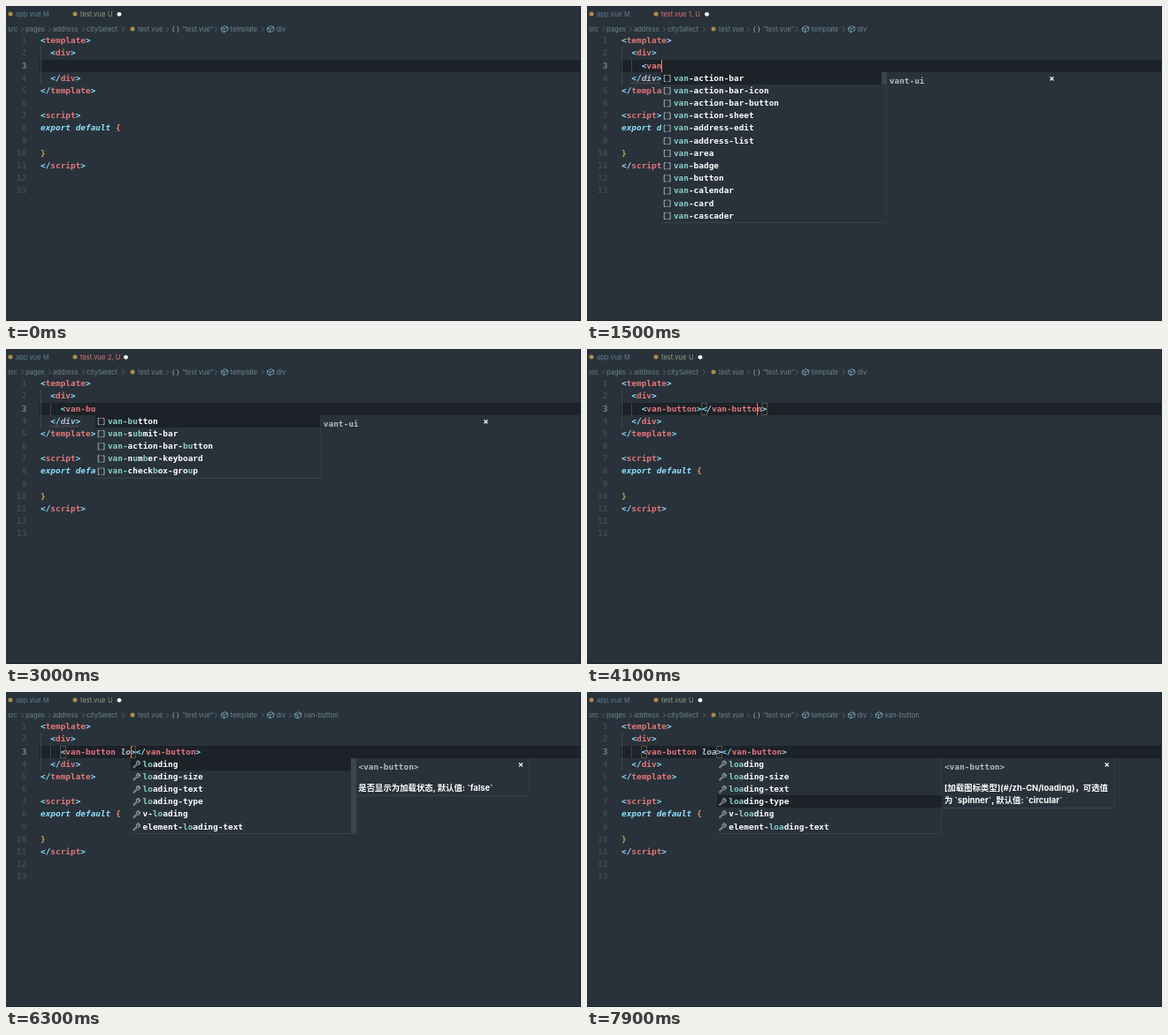
An HTML page for the animation above (8000 ms loop, 650 by 357 pixels).

```html
<!DOCTYPE html>
<html lang="en">
<head>
<meta charset="utf-8">
<title>Editor completion</title>
<style>
  html, body { margin: 0; width: 100%; height: 100%; overflow: hidden; background: #29323a; }
  svg { display: block; }
  rect { shape-rendering: crispEdges; }
  text { white-space: pre; }
  .mono { font: bold 9.41px "DejaVu Sans Mono", monospace; }
  .ui { font: 7.5px Inter, "Open Sans", sans-serif; }
  .doc { font: 700 9.4px Inter, "Noto Sans CJK SC", "Noto Sans CJK", sans-serif; fill: #fff; }
  .p { fill: #8fe0ff; }
  .t { fill: #e2777a; }
  .a { fill: #b3bfd0; font-style: italic; }
  .k { fill: #8fe0ff; font-style: italic; }
  .open { fill: #f08b62; }
  .close { fill: #d29c55; }
  .num { fill: #3d4b55; }
  .now { fill: #71868f; }
  .label { fill: #fff; }
  .hit { fill: #8acdca; }
  .head { fill: #b0bcc3; }
  .crumb { fill: #6c838e; }
  .icon { fill: none; stroke: #c3cfd5; stroke-width: .8; }
  .cube { fill: none; stroke: #7fb0c4; stroke-width: .8; stroke-linejoin: round; }
  .sep { fill: none; stroke: #5b6f79; stroke-width: .8; }
</style>
</head>
<body>
<svg id="stage" width="650" height="357" viewBox="0 0 650 357"></svg>
<script>
const LOOP = 8000, CW = 5.667, LH = 14.17, LEFT = 39, TOP = 32.3;
const BG = "#29323a", DARK = "#1c2228", EDGE = "#37424a", BAR = "#3a454e", GOLD = "#ae8a50";
const FULL = "<van-button></van-button>";

const van = names => names.split(" ").map(n => "van-" + n);
const lists = {
  html: "a abbr address article aside audio b base bdi bdo blockquote body".split(" "),
  van: van("action-bar action-bar-icon action-bar-button action-sheet address-edit address-list area badge button calendar card cascader"),
  vanB: van("badge button action-bar action-bar-icon action-bar-button nav-bar submit-bar tabbar tabbar-item sidebar checkbox number-keyboard"),
  vanBu: van("button submit-bar action-bar-button number-keyboard checkbox-group"),
  attrs: "block color disabled hairline icon icon-position icon-prefix loading loading-size loading-text loading-type native-type".split(" "),
  load: "loading loading-size loading-text loading-type v-loading element-loading-text".split(" ")
};

// start time, text of line 3, caret column, list, typed query
const steps = [
  [-700, "", 0],
  [450, "<", 1, "html", ""],
  [1050, "<v", 2, "van", "v"],
  [1250, "<va", 3, "van", "va"],
  [1400, "<van", 4, "van", "van"],
  [1750, "<van-", 5, "van", "van-"],
  [2250, "<van-b", 6, "vanB", "van-b"],
  [2500, "<van-bu", 7, "vanBu", "van-bu"],
  [3250, FULL, 25],
  [3800, FULL, 24],
  [4000, FULL, 23],
  [4700, FULL, 22],
  [5300, FULL, 11],
  [5650, "<van-button ></van-button>", 12, "attrs", ""],
  [5950, "<van-button l></van-button>", 13, "load", "l"],
  [6150, "<van-button lo></van-button>", 14, "load", "lo"],
  [6400, "<van-button loa></van-button>", 15, "load", "loa"]
];
const picks = [[7700, 3], [7450, 2], [7200, 1], [0, 0]];
const docs = [
  ["是否显示为加载状态, 默认值: `false`"],
  ["加载图标大小, 默认单位为 `px`"],
  ["加载状态提示文字"],
  ["[加载图标类型](#/zh-CN/loading)，可选值", "为 `spinner`, 默认值: `circular`"]
];

const esc = s => s.replace(/&/g, "&amp;").replace(/</g, "&lt;").replace(/>/g, "&gt;");
const text = (x, y, s, cls, extra = "") => `<text x="${x}" y="${y}" class="${cls}" ${extra}>${s}</text>`;
const rect = (x, y, w, h, fill, extra = "") => `<rect x="${x}" y="${y}" width="${w}" height="${h}" fill="${fill}" ${extra}/>`;
const path = (d, cls, x = 0, y = 0) => `<path d="${d}" class="${cls}" transform="translate(${x} ${y})"/>`;
const dot = (x, y, r, fill) => `<circle cx="${x}" cy="${y}" r="${r}" fill="${fill}"/>`;
const span = (s, cls) => `<tspan class="${cls}">${esc(s)}</tspan>`;
const colX = c => LEFT + c * CW;
const rowY = n => TOP + (n - 1) * LH;
const code = (n, col, html) => text(colX(col), rowY(n) + 10, html, "mono");

// Panel with a line along its right and bottom edges only
const panel = (x, y, w, h) => rect(x, y, w, h, BG) +
  rect(x, y + h - 1, w, 1, EDGE) + rect(x + w - 1, y, 1, h, "#303a42");

function markup(s, name = "t") {
  return s.split(/(<\/?|>|\s+[\w-]*)/).filter(Boolean)
    .map(w => span(w, /^[<>]/.test(w) ? "p" : w[0] === " " ? "a" : name)).join("");
}

function tabs(errors) {
  const color = errors ? "#e57373" : "#8fa184";
  const x = errors ? 135.5 : 128;
  return dot(5, 9, 2.5, GOLD) + dot(78, 9, 2.5, GOLD) +
    text(11, 11.7, "app.vue", "ui", 'fill="#5f7b8f"') + text(42, 11.7, "M", "ui", 'fill="#5f7b96"') +
    text(84, 11.7, "test.vue", "ui", `fill="${color}"`) +
    text(115, 11.7, errors ? errors + ", U" : "U", "ui", `fill="${color}"`) +
    dot(x, 9.3, 2.4, "#fff");
}

function crumbs(deep) {
  const words = [[2, "src"], [22, "pages"], [53, "address"], [91, "citySelect"], [149, "test.vue"],
    [199, "\"test.vue\""], [253.5, "template"], [305.5, "div"]];
  const seps = [17, 48, 86, 131, 181, 236, 289], cubes = [247, 299];
  if (deep) { words.push([336.5, "van-button"]); seps.push(320); cubes.push(330); }
  return words.map(([x, s]) => text(x, 29, s, "ui crumb")).join("") +
    seps.map(x => path("M0-2.7L2.7 0L0 2.7", "sep", x, 26.4)).join("") +
    cubes.map(x => path("M-3.6-1.4L.6-3.6L3.8-2V1.4L-.6 3.6L-3.6 2ZM-3.6-1.4L-.6 0L3.8-2M-.6 0V3.6", "cube", x, 26.2)).join("") +
    dot(143, 26, 2.5, GOLD) + text(187.5, 29, "{ }", "ui", 'fill="#a9bcc4"');
}

function page(line, broken) {
  let out = rect(37.5, rowY(3), 612, LH, DARK);
  for (let n = 1; n <= 13; n++)
    out += text(23.3, rowY(n) + 10, n, n === 3 ? "mono now" : "mono num", 'text-anchor="end"');
  out += rect(39, rowY(2), 1, LH * 3, "#3c4850");
  if (line) out += rect(50, rowY(3), 1, LH, "#3c4850");
  out += code(1, 0, markup("<template>")) + code(2, 2, markup("<div>")) +
    code(4, 2, markup("</div>", broken ? "a" : "t")) + code(5, 0, markup("</template>")) +
    code(7, 0, markup("<script>")) + code(8, 0, span("export default ", "k") + span("{", "open")) +
    code(10, 0, span("}", "close")) + code(11, 0, markup("<\/script>"));
  if (broken) {
    let wave = "M50 87.5";
    for (let i = 0; i < 8; i++) wave += "q1-2 2 0t2 0";
    out += `<path d="${wave}" fill="none" stroke="#80605f" stroke-width=".7"/>`;
  }
  return out;
}

// Indexes of the label's letters that match the query
function matches(label, query) {
  const run = s => {
    const i = label.lastIndexOf(s);
    return i < 0 ? null : [...s].map((c, k) => i + k);
  };
  const scan = s => {
    let i = 3;
    const found = [...s].map(c => i = i < 0 ? -1 : label.indexOf(c, i + 1));
    return found.includes(-1) ? null : found;
  };
  if (!query) return [];
  if (label.startsWith(query)) return [...query].map((c, k) => k);
  if (!query.startsWith("van-")) return run(query) || [];
  const tail = query.slice(4), back = [...tail].reverse().join("");
  return [0, 1, 2, 3].concat(run(tail) || scan(tail) || scan(back) || []);
}

function item(label, query, x, y, snippet) {
  const hit = matches(label, query);
  const html = [...label].map((c, i) => span(c, hit.includes(i) ? "hit" : "label")).join("");
  const icon = snippet
    ? path("M-1.6-3.6H-3.4V3.6H-1.6M1.6 3.6H3.4V-3.6H1.6M-.6-3.6H.6M-.6 3.6H.6", "icon", x + 6.3, y + 7.2)
    : path("M.2-.4C-.8-3 1.2-4.4 3-3.6L1.6-2L2.4-1.1L4-2.4C4.6-.4 2.8 1.4 1 .5L-2.8 4.2L-3.8 3.4Z", "icon", x + 6.5, y + 7);
  return icon + text(x + 13.6, y + 10, html, "mono");
}

function popup(x, key, query, pick) {
  const items = lists[key], top = rowY(4), h = items.length * LH + 1, end = x + 254.5;
  const snippet = key.startsWith("van");
  let out = panel(x, top, 254.5, h) + rect(x, top + pick * LH, 254, LH, DARK);
  if (key === "van") out += rect(end - 6, top, 6, LH, BAR);
  if (key === "load" && query !== "loa") out += rect(end - 6, top, 6, h, BAR);
  out += items.map((s, i) => item(s, query, x, top + i * LH, snippet)).join("");
  if (key === "html") return out;

  const lines = snippet ? [] : key === "attrs" ? ["是否为块级元素, 默认值: `false`"] : docs[pick];
  if (lines.length) out += panel(end, top, 195.5, 29 + lines.length * LH);
  out += text(x + 257.5, top + 12.7, snippet ? "vant-ui" : esc("<van-button>"), "mono head") +
    text(x + 441, top + 11, "×", "doc", 'text-anchor="middle"');
  return out + lines.map((s, i) => text(x + 257.3, 111.8 + i * LH, s, "doc")).join("");
}

function pointer(t) {
  if (t < 4800 || t >= 5550) return "";
  const k = Math.min(1, (t - 4800) / 250), ease = 1 - (1 - k) ** 3;
  return `<path d="M-1.5-4.5Q0-4.5 0-3V3Q0 4.5-1.5 4.5M1.5-4.5Q0-4.5 0-3M0 3Q0 4.5 1.5 4.5M-1 0H1"
    transform="translate(${121 + 6 * (1 - ease)} ${68.5 + 30 * (1 - ease)})" fill="none" stroke="#fff" stroke-width=".9"/>`;
}

function scene(t) {
  const [start, line, caret, list, query] = steps.findLast(s => s[0] <= t);
  const pick = picks.find(p => p[0] <= t)[1];
  const broken = line !== "" && !line.includes(">");
  const errors = broken ? (line.length > 5 ? 2 : 1) : 0;
  let out = rect(0, 0, 650, 357, BG) + tabs(errors) + crumbs(t >= 4400) + page(line, broken);

  if (t >= 4400 && t < 5650)
    for (const c of [5, 18]) out += rect(colX(c), rowY(3), CW * 10, LH, "#4a5157");
  if (line && !broken) {
    const pair = caret > 12 && line === FULL ? [12, 24] : [0, line.indexOf(">")];
    for (const c of pair)
      out += rect(colX(c + 4), rowY(3) + .6, CW, LH - 1.2, "none", 'stroke="#6d6a52" stroke-width=".7"');
  }
  out += code(3, 4, markup(line));
  const x = colX(caret + 4);
  if (Math.floor((t - start) / 500) % 2 === 0) out += rect(x - .4, rowY(3), 1.3, LH, "#ee7b58");
  if (list) out += popup(x, list, query, pick);
  return out + pointer(t) + rect(649, 0, 1, 357, "#222a31") + rect(0, 356, 650, 1, "#20272d");
}

const stage = document.getElementById("stage");
const begin = performance.now();
let shown = "";
function tick() {
  const next = scene((performance.now() - begin) % LOOP);
  if (next !== shown) stage.innerHTML = shown = next;
  requestAnimationFrame(tick);
}
tick();
</script>
</body>
</html>
```
